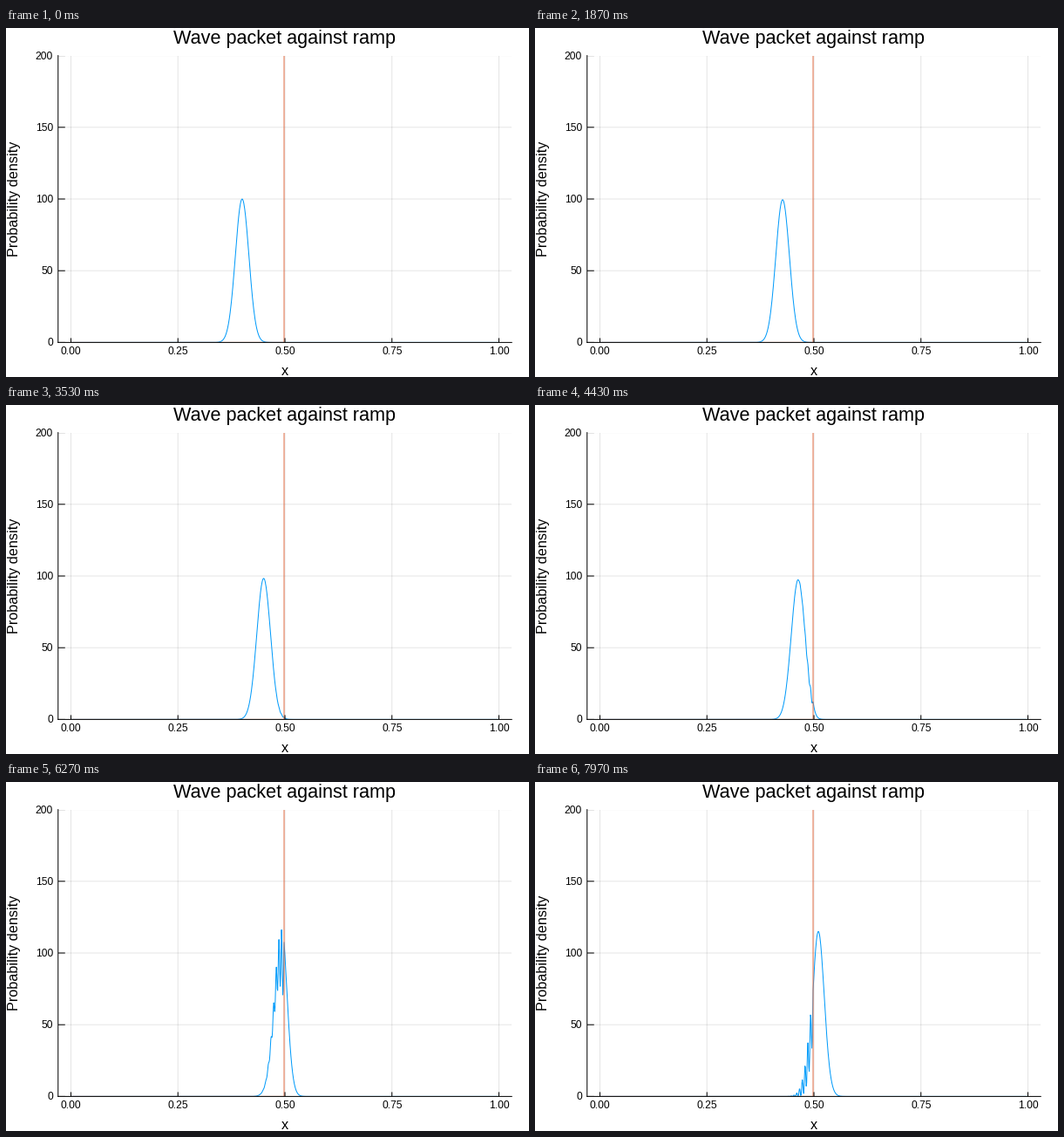
Recreate the animation shown at these times as a matplotlib script. Size 600x400 px, loop 8 s.

```python
import matplotlib.pyplot as plt
import numpy as np
from matplotlib.animation import FuncAnimation

W, H, DPI = 600, 400, 100
PX = 72 / DPI                      # one pixel in points
LEFT, RIGHT, TOP, BOTTOM = 59.77, 580.23, 31.6, 360.4
FRAMES, LOOP = 240, 8000

# Wave packet on a grid, hbar = m = 1
N, DT, K0, STEP = 1001, 1e-6, 500, 5e4
x = np.linspace(0, 1, N)
dx = x[1] - x[0]
potential = np.where(x > 0.4985, STEP, 0.0)


def evolve():
    """Probability density, one column per frame."""
    hop = np.full(N - 1, -0.5 / dx**2)
    ham = np.diag(potential + 1 / dx**2) + np.diag(hop, 1) + np.diag(hop, -1)
    energy, modes = np.linalg.eigh(ham)
    start = 10 * np.exp(-1000 * (x - 0.4)**2 + 1j * K0 * x)
    coef = modes.T @ start
    phase = np.exp(-1j * np.outer(energy, np.arange(FRAMES) * DT))
    return np.abs(modes @ (coef[:, None] * phase))**2


density = evolve()

plt.rcParams["font.family"] = "Liberation Sans"
fig = plt.figure(figsize=(W / DPI, H / DPI), dpi=DPI, facecolor="white")
ax = fig.add_axes([LEFT / W, 1 - BOTTOM / H,
                   (RIGHT - LEFT) / W, (BOTTOM - TOP) / H])
ax.set_xlim(-0.03, 1.03)
ax.set_ylim(0, 200)
ax.set_xticks([])
ax.set_yticks([])
for side in ("top", "right"):
    ax.spines[side].set_visible(False)
for side in ("left", "bottom"):
    ax.spines[side].set(linewidth=PX, zorder=5, snap=False)


def label(px, py, text, size, **kw):
    opts = dict(ha="center", va="baseline", fontsize=size * PX, color="black")
    fig.text(px / W, 1 - py / H, text, **{**opts, **kw})


def rule(xs, ys, alpha, z):
    ax.plot(xs, ys, color="black", alpha=alpha, lw=PX, zorder=z,
            solid_capstyle="butt", snap=False)


x_unit = (RIGHT - LEFT) / 1.06
y_unit = (BOTTOM - TOP) / 200

for v in np.linspace(0, 1, 5):
    rule([v, v], [0, 200], 0.1, 1)
    rule([v, v], [0, 5 / y_unit], 1, 5)
    label(LEFT + (v + 0.03) * x_unit, 374, f"{v:.2f}", 12)

for v in range(0, 201, 50):
    rule([-0.03, 1.03], [v, v], 0.1, 1)
    rule([-0.03, -0.03 + 8 / x_unit], [v, v], 1, 5)
    label(54, BOTTOM - v * y_unit + 4, str(v), 12, ha="right")

label(320, 18, "Wave packet against ramp", 21.7)
label(320, 398, "x", 16.3)
label(14, 195.5, "Probability density", 16.3, rotation=90,
      rotation_mode="anchor")

wave, = ax.plot(x, density[:, 0], color="#009afa", lw=PX, zorder=3,
                snap=False)
ax.plot(x, potential, color="#e36f47", lw=PX, zorder=4, snap=False)


def draw(i):
    wave.set_ydata(density[:, i])
    return wave,


anim = FuncAnimation(fig, draw, frames=FRAMES, interval=LOOP / FRAMES,
                     init_func=lambda: draw(0), repeat=True, repeat_delay=0)
plt.show()
```
